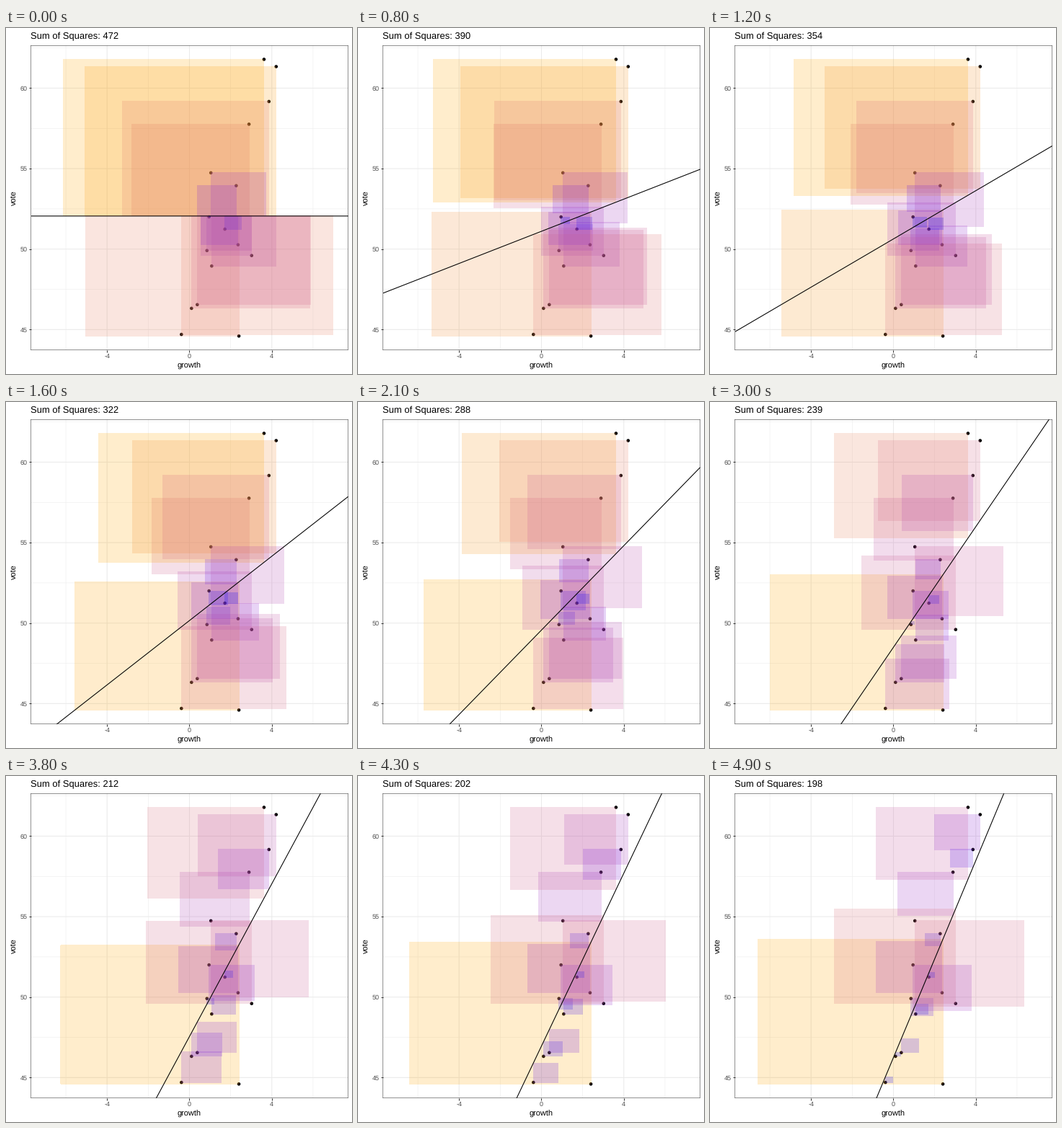
Recreate the animation shown at these times as a matplotlib script. Size 480 px wide and 480 px high, loop 5000 ms.

```python
import numpy as np
import matplotlib.pyplot as plt
from matplotlib.animation import FuncAnimation
from matplotlib.collections import EllipseCollection
from matplotlib.colors import LinearSegmentedColormap
from matplotlib.patches import Rectangle

SIZE, DPI = 480, 72          # at 72 dpi one point is one pixel
FRAMES, INTERVAL = 50, 100
LEFT, RIGHT, TOP, BOTTOM = 34.5, 474.5, 24.3, 446.5
THIN = 1.07
X_LIMIT = 7                  # the widest square reaches about this far

plt.rcParams.update({"font.family": "Liberation Sans", "text.hinting": "none",
                     "path.snap": False, "axes.unicode_minus": False})

# the observations: growth, vote
points = np.array([
    (2.40, 44.60), (2.89, 57.76), (0.85, 49.91), (4.21, 61.34),
    (3.02, 49.60), (3.62, 61.79), (1.08, 48.95), (-0.39, 44.70),
    (3.86, 59.17), (2.27, 53.94), (0.38, 46.55), (1.04, 54.74),
    (2.36, 50.27), (1.72, 51.24), (0.10, 46.32), (0.95, 52.00)])
growth, vote = points.T
mean_growth, mean_vote = points.mean(axis=0)
best_slope = np.polyfit(growth, vote, 1)[0]
# squares open towards the middle of the data
direction = np.where(growth > mean_growth, -1, 1)

# blue to orange, with the hues a perceptual blend passes through
shades = LinearSegmentedColormap.from_list("shades", [
    (0, "blue"), (1 / 8, "#6f1ae5"), (1 / 4, "#9730cd"),
    (1 / 2, "#c8599b"), (3 / 4, "#e77f65"), (1, "orange")])


def expand(low, high, share=0.05):
    margin = share * (high - low)
    return np.array([low - margin, high + margin])


def label(x, y, text, size, **kwargs):
    return fig.text(x / SIZE, 1 - y / SIZE, text, fontsize=size,
                    va="baseline", **kwargs)


def grid(draw_line, ticks):
    step = ticks[1] - ticks[0]
    for tick in ticks:
        draw_line(tick, color="#ebebeb", lw=THIN, zorder=0)
    for half in np.append(ticks, ticks[-1] + step) - step / 2:
        draw_line(half, color="#ebebeb", lw=THIN / 2, zorder=0)


fig = plt.figure(figsize=(SIZE / DPI, SIZE / DPI), dpi=DPI, facecolor="white")
ax = fig.add_axes([LEFT / SIZE, 1 - BOTTOM / SIZE,
                   (RIGHT - LEFT) / SIZE, (BOTTOM - TOP) / SIZE])
x_range = expand(-X_LIMIT, X_LIMIT)
x_ticks, y_ticks = np.arange(-4, 5, 4), np.arange(45, 61, 5)
ax.set(xlim=x_range, ylim=expand(vote.min(), vote.max()),
       xticks=x_ticks, yticks=y_ticks)
ax.tick_params(length=2.74, width=THIN, color="#333333", pad=2.4,
               labelsize=9, labelcolor="#4d4d4d")
ax.spines[:].set(linewidth=THIN / 2, color="#333333")
grid(ax.axvline, x_ticks)
grid(ax.axhline, y_ticks)

label((LEFT + RIGHT) / 2, 472, "growth", 11, ha="center")
label(13.5, (TOP + BOTTOM) / 2, "vote", 11, ha="center",
      rotation=90, rotation_mode="anchor")
title = label(LEFT - 0.5, 15, "", 13, ha="left")

dot_size = np.full(len(points), 4.6)
ax.add_collection(EllipseCollection(
    dot_size, dot_size, 0 * dot_size, units="points", offsets=points,
    offset_transform=ax.transData, facecolor="black", lw=0, zorder=1),
    autolim=False)
squares = [ax.add_patch(Rectangle((0, 0), 0, 0, lw=0, alpha=0.2, zorder=2,
                                  antialiased=False))
           for _ in points]
fit_line, = ax.plot([], [], color="black", lw=THIN, zorder=2.4)


def update(frame):
    slope = best_slope * frame / (FRAMES - 1)
    intercept = mean_vote - slope * mean_growth
    fitted = intercept + slope * growth
    residual = vote - fitted
    error = np.abs(residual)
    colors = shades((error - error.min()) / np.ptp(error))
    for i, square in enumerate(squares):
        square.set_bounds(growth[i], fitted[i],
                          direction[i] * error[i], residual[i])
        square.set_facecolor(colors[i, :3])
    fit_line.set_data(x_range, intercept + slope * x_range)
    title.set_text(f"Sum of Squares: {np.sum(residual ** 2):.0f}")
    return [*squares, fit_line, title]


anim = FuncAnimation(fig, update, frames=FRAMES, interval=INTERVAL,
                     repeat=True, repeat_delay=0, blit=False)
plt.show()
```
